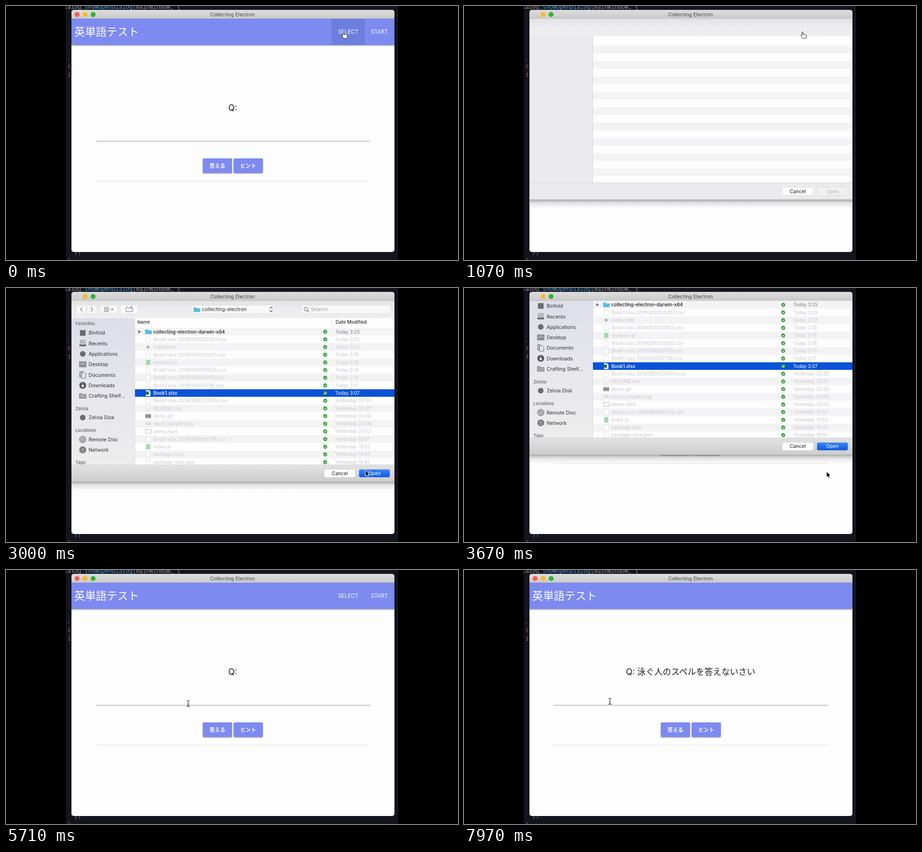
Write an HTML page that moves like this. It is 960 px wide and 540 px high and loops after 8000 ms.

```html
<!DOCTYPE html>
<html lang="ja">
<head>
<meta charset="utf-8">
<title>英単語テスト</title>
<style>
html, body { margin: 0; width: 100%; height: 100%; overflow: hidden; background: #000; }
svg { display: block; width: 960px; height: 540px; font-family: Inter, "Noto Sans CJK JP", "Noto Sans CJK", sans-serif; }
.code { font-family: "Noto Sans Mono", "DejaVu Sans Mono", monospace; }
text { white-space: pre; }
</style>
</head>
<body>
<svg id="stage" viewBox="0 0 960 540"></svg>
<script>
const LOOP = 8000, SHEET_HEIGHT = 385, SLIDE = 345;
const OPENING = 731, CLOSING = 3584, CLOSED = CLOSING + SLIDE;
const INK = '#303033', FAINT = '#c9c9ce', PURPLE = '#7d8af0', HOVER = '#6d7fdd', PAPER = '#fdfdfd';
const PANEL = '#ebebee', RED = '#fc5b50';

const attrs = (o = {}) => Object.entries(o).map(([k, v]) => ` ${k}="${v}"`).join('');
const rect = (x, y, w, h, fill, more) => `<rect x="${x}" y="${y}" width="${w}" height="${h}" fill="${fill}"${attrs(more)}/>`;
const circle = (x, y, r, fill, more) => `<circle cx="${x}" cy="${y}" r="${r}" fill="${fill}"${attrs(more)}/>`;
const path = (d, stroke, width = 1, fill = 'none') => `<path d="${d}" fill="${fill}" stroke="${stroke}" stroke-width="${width}"/>`;
// Text is placed by the vertical middle of its capitals.
const text = (x, y, s, size, fill = INK, more) =>
  `<text x="${x}" y="${y + size * 0.363}" font-size="${size}" fill="${fill}"${attrs(more)}>${s}</text>`;
const group = (id, body, more) => `<g id="${id}"${attrs(more)}>${body}</g>`;
const gradient = (id, ...stops) => `<linearGradient id="${id}" x2="0" y2="1">` +
  stops.map(([at, color, alpha = 1]) => `<stop offset="${at}" stop-color="${color}" stop-opacity="${alpha}"/>`).join('') + '</linearGradient>';
const MIDDLE = { 'text-anchor': 'middle' };
const MEDIUM = { 'font-weight': 500 };

const defs = `<defs>
  ${gradient('bar', [0, '#dedede'], [1, '#cacaca'])}
  ${gradient('footer', [0, '#e2e2e3'], [1, '#cdcdce'])}
  ${gradient('tools', [0, '#e2e2e3'], [0.5, '#ededef'], [1, '#eeeef0'])}
  ${gradient('side', [0, '#dedeea'], [0.5, '#e6e6ec'], [1, '#ededed'])}
  ${gradient('blue', [0, '#3f88f6'], [1, '#0b56e0'])}
  ${gradient('fade', [0, '#202024', 0.38], [0.35, '#404044', 0.16], [1, '#606064', 0])}
  <clipPath id="desktop"><rect x="127" width="706" height="540"/></clipPath>
  <clipPath id="window"><rect x="139" y="8.5" width="686" height="514.5" rx="5"/></clipPath>
  <clipPath id="below"><rect x="139" y="27" width="686" height="496"/></clipPath>
  <clipPath id="lists"><rect x="139" y="64" width="686" height="312"/></clipPath>
  <filter id="soft" x="-10%" y="-20%" width="120%" height="150%">
    <feDropShadow dx="0" dy="1.3" stdDeviation="1.3" flood-color="#404048" flood-opacity=".5"/>
  </filter>
</defs>`;

function editor() {
  const code = (x, y, s, fill) => `<text class="code" x="${x}" y="${y}" font-size="12.1" fill="${fill}">${s}</text>`;
  return group('editor', rect(127, 0, 706, 540, '#14141d') +
    code(116, 6, 'dialog.', '#8c8c96') + code(167, 6, 'showOpenDialog', '#4f9fd0') + code(269, 6, '(mainWindow, {', '#96969e') +
    code(122, 114, ').', '#8c8c96') + code(131, 132, 'c', '#b8585c') + code(131, 150, 'i', '#b8585c') +
    code(145, 528, '})', '#777780') + code(131, 545, '}', '#777780'), { 'clip-path': 'url(#desktop)' });
}

function page() {
  const button = (x, label) => rect(x, 324, 62, 31, PURPLE, { rx: 2, filter: 'url(#soft)' }) +
    text(x + 31, 339.5, label, 11.3, '#fff', { ...MIDDLE, 'font-weight': 700 });
  return rect(139, 8, 686, 515, PAPER) +
    rect(139, 20, 686, 63, PURPLE, { filter: 'url(#soft)' }) +
    text(145, 55, '英単語テスト', 22.9, '#fff', MEDIUM) +
    group('nav',
      rect(692, 27, 70, 56, HOVER, { id: 'hoverSelect' }) + rect(762, 27, 63, 56, HOVER, { id: 'hoverStart' }) +
      text(726.7, 55, 'SELECT', 11.4, '#fff', MIDDLE) + text(793, 55, 'START', 11.4, '#fff', MIDDLE)) +
    text(481.5, 216, 'Q:', 18, '#1c1c1e', { ...MIDDLE, id: 'question' }) +
    rect(190, 287, 583, 1, '#949496') + rect(190, 372, 583, 1, '#dcdcde') +
    button(418, '答える') + button(483.5, 'ヒント');
}

const folder = (x, y, fill, stroke = 'none') => path(`M${x - 7} ${y - 5}h5l1.5 2h7.5v8h-14z`, stroke, 1, fill);
const sheetOfPaper = (x, y, stroke, fill = 'none') => path(`M${x - 4.5} ${y - 6}h6l3 3v9h-9z`, stroke, 1, fill);

const GREY = '#6c6c70';
const sideIcons = {
  square: y => rect(157, y - 6, 12, 12, GREY),
  disk: y => circle(163, y, 6, GREY),
  recent: y => rect(158, y - 6.5, 10, 9, 'none', { stroke: GREY }) + path(`M160 ${y - 3}h6m-6 2h6`, GREY) + rect(156, y + 2, 14, 4, GREY),
  desktop: y => rect(156, y - 5.5, 14, 11, '#a2a2a6', { stroke: GREY }) + path(`M157 ${y + 3}h12`, GREY),
  papers: y => sheetOfPaper(161, y - 1, GREY, '#b8b8bc') + sheetOfPaper(165, y + 1, GREY, '#e4e4e8'),
  down: y => circle(163, y, 7.3, '#555558') + path(`M163 ${y - 4}v7m-3 -3l3 3.5l3 -3.5`, '#f2f2f4', 1.7),
  folder: y => folder(163, y, '#aaaaae', GREY),
  disc: y => circle(163, y, 7, '#b4b4b8', { stroke: GREY }) + circle(163, y, 2, '#eeeeee', { stroke: GREY }),
  globe: y => circle(163, y, 7.3, GREY) + path(`M156 ${y}h14M163 ${y - 7}v14M158 ${y - 4}q5 3 10 0M158 ${y + 4}q5 -3 10 0`, '#d4d4d8', 0.8),
};

function sidebar() {
  const heads = [[76, 'Favorites'], [256.5, 'Zelvia'], [302.5, 'Locations'], [371, 'Tags']];
  const items = [
    [95.5, 'square', 'Binfold'], [118, 'recent', 'Recents'], [140, 'disk', 'Applications'], [162.3, 'desktop', 'Desktop'],
    [184.7, 'papers', 'Documents'], [207, 'down', 'Downloads'], [229.3, 'folder', 'Crafting Shelf...'],
    [275.5, 'disk', 'Zelvia Disk'], [322, 'disc', 'Remote Disc'], [344, 'globe', 'Network'],
  ];
  return heads.map(([y, s]) => text(147.5, y, s, 9.3, '#717175', { 'font-weight': 600 })).join('') +
    items.map(([y, icon, s]) => sideIcons[icon](y) + text(175.5, y, s, 10.6)).join('');
}

const files = `collecting-electron-darwin-x64|Today 3:25
Book1.xlsx.20190810032457.csv|Today 3:25
index.html|Today 3:22
Book1.xlsx.20190810031825.csv|Today 3:18
renderer.js|Today 3:18
Book1.xlsx.20190810031623.csv|Today 3:16
Book1.xlsx.20190810031415.csv|Today 3:14
Book1.xlsx.20190810031116.csv|Today 3:11
Book1.xlsx|Today 3:07
Book1.xlsx.20190809203504.csv|Yesterday 20:35
README.md|Yesterday 20:27
demo.gif|Yesterday 20:26
excel_sample.png|Yesterday 20:06
demo.mp4|Yesterday 20:03
Book1.xlsx.20190809195719.csv|Yesterday 19:57
index.js|Yesterday 19:52
package.json|Yesterday 19:47
package-lock.json|Yesterday 19:41`.split('\n').map(line => line.split('|'));
const PICK = 8, rowY = i => 93 + i * 16.3;

function fileIcon(name, y) {
  if (!name.includes('.')) return path(`M281 ${y - 3.5}l6 3.5l-6 3.5z`, 'none', 0, '#747478') + folder(302.5, y, '#55bfe8');
  if (name.endsWith('.xlsx')) return sheetOfPaper(302, y, '#d0d0d2', '#fff') + rect(296.5, y - 3.5, 7, 7, '#28763c');
  if (name.endsWith('.html')) return circle(302, y, 3.2, '#a9b8b0');
  if (name.endsWith('.js')) return rect(297.5, y - 5.5, 9, 11, '#9fdcab');
  if (name.endsWith('.gif')) return rect(296, y - 4.5, 12, 9, '#8a8a80') + path(`M297 ${y - 3}h10m-10 6h10`, '#dedee0');
  if (name.endsWith('.png')) return path(`M296 ${y - 2}h12m-12 3h12`, '#c2c2c6', 1.2);
  if (name.endsWith('.mp4')) return rect(296.5, y - 4, 12, 8, '#fdfdfd', { stroke: '#b8b8bc' });
  return sheetOfPaper(302, y, '#dcdcde', '#fefefe') + (name.endsWith('.md') ? path(`M299 ${y - 1}h6m-6 2h6m-6 2h6`, '#c8c8ca', 0.7) : '');
}

function fileRow([name, date], i) {
  const y = rowY(i), live = i === 0 || i === PICK, extra = live ? MEDIUM : {};
  const picked = i === PICK ? 'picked' : '';
  return fileIcon(name, y) +
    text(313, y, name, 10.1, live ? '#1c1c1e' : FAINT, { ...extra, class: picked }) +
    text(699, y, date, 9.9, live ? '#808084' : FAINT, { class: picked });
}

function sheet() {
  const tool = (x, w) => rect(x, 36.5, w, 18, '#f8f8f9', { rx: 3, stroke: '#d8d8da', 'stroke-width': 0.7 });
  const stripes = files.map((_, i) => i % 2 ? '' : rect(274, rowY(i) - 8.15, 551, 16.3, '#f3f3f5')).join('');
  const checks = files.map((_, i) => circle(678, rowY(i), 4.3, '#2fa52c') + path(`M676 ${rowY(i)}l1.5 1.7l2.8 -3.4`, '#fff', 1.1)).join('');
  const toolbar = tool(149, 21) + tool(172, 21) + tool(200, 37) + tool(243, 38) + tool(393, 178) + tool(628, 188) +
    path('M162 41l-4 4.5l4 4.5M180 41l4 4.5l-4 4.5', '#848488', 1.3) +
    path('M208 41h11m-11 3h11m-11 3h11m-11 3h11M223 44l2.7 2.7l2.7 -2.7', '#646468', 1.2) +
    path('M255 41h4l2 2h8v7h-14zM266 38v5m-2.5 -2.5h5', '#747478') +
    folder(405.5, 46, '#55bfe8') + text(416, 45.5, 'collecting-electron', 10.7) +
    path('M560 43.5l3 -3l3 3m-6 4l3 3l3 -3', '#535356', 1.3) +
    circle(637, 45, 3.8, 'none', { stroke: '#646468', 'stroke-width': 1.2 }) + path('M640 48l3.5 3.5', '#646468', 1.2) +
    text(648, 45.5, 'Search', 10.6, '#9c9ca0');
  const content = toolbar + group('lists-content', rect(139, 64, 134, 312, 'url(#side)') + sidebar() +
    text(279, 72.5, 'Name', 9.6, INK, MEDIUM) + text(700, 72.5, 'Date Modified', 9.9, INK, MEDIUM) + rect(690, 66, 1, 16, '#d8d8da') +
    rect(274, rowY(PICK) - 8.1, 551, 16, '#0a52d8', { id: 'selection' }) +
    files.map(fileRow).join('') + group('checks', checks), { 'clip-path': 'url(#lists)' });
  const push = (x, label, id) => rect(x, 385.5, 66, 17, '#fefefe', { rx: 3.5, id, stroke: '#cfcfd1', 'stroke-width': 0.6 }) +
    text(x + 33, 394, label, 10.5, '#1c1c1e', { ...MIDDLE, id: id + 'Label' });
  return group('sheetClip', group('sheet',
    rect(139, 412, 686, 18, 'url(#fade)') +
    rect(139, 27, 686, 385, PANEL) + rect(139, 27, 686, 37, 'url(#tools)') +
    rect(273, 64, 552, 312, PAPER) +
    group('rows', stripes, { 'clip-path': 'url(#lists)' }) +
    group('content', content) + rect(273, 64, 1, 312, '#d6d6d9') +
    rect(139, 376, 686, 36, 'url(#footer)', { id: 'bottom' }) + rect(139, 375.5, 686, 1, '#d4d4d6') +
    rect(139, 411.5, 686, 0.8, '#b0b0b3') +
    push(676, 'Cancel', 'cancel') + push(749.5, 'Open', 'open')), { 'clip-path': 'url(#below)' });
}

const titleBar = () => rect(139, 8, 686, 19, 'url(#bar)') + rect(139, 26.3, 686, 0.7, '#b6b6b8') +
  [RED, '#fdb924', '#2cb52f'].map((c, i) => circle(151 + 17 * i, 18, 5.2, c, i ? {} : { id: 'close' })).join('') +
  text(481, 18.5, 'Collecting Electron', 10.7, '#47474a', MIDDLE);

const cursors = group('cursor',
  group('arrow', path('M0 0v12.5l2.8 -2.6l2 4.6l2.3 -1l-2 -4.4h4z', '#fff', 1, '#000')) +
  group('hand', path('M-1.5 1q1.5 -2 2.5 0v5l1 -1.5l2 .5l.5 .5l2 .3l.5 1l1.4 .8v3l-1.6 3.4h-6l-4.3 -5.5q0 -2 2 -.5z', '#222', 1, '#fff')) +
  group('beam', path('M-3.5 -6.5q3 0 3.5 1.5q.5 -1.5 3.5 -1.5M0 -5v10M-3.5 6.5q3 0 3.5 -1.5q.5 1.5 3.5 1.5M-1.5 1.5h3', '#303033', 1.2)));

document.getElementById('stage').innerHTML = defs + editor() +
  group('app', page() + sheet() + titleBar(), { 'clip-path': 'url(#window)' }) + cursors;

const el = id => document.getElementById(id);
const show = (id, on) => el(id).setAttribute('display', on ? 'inline' : 'none');
const fill = (id, color) => el(id).setAttribute('fill', color);
const picked = [...document.querySelectorAll('.picked')].map(node => [node, node.getAttribute('fill')]);

const ease = x => (1 - Math.cos(Math.PI * Math.min(1, Math.max(0, x)))) / 2;
const moves = [ // time, x, y of the pointer's hot spot
  [0, 717, 55], [500, 719, 55], [1150, 719, 55], [1720, 383, 197], [1800, 383, 197], [2000, 365, 220],
  [2450, 365, 220], [3050, 770, 390], [4250, 770, 390], [4950, 387, 284], [5900, 387, 284],
  [6450, 790, 56], [7150, 790, 56], [7850, 310, 279], [LOOP, 310, 279],
];

function pointer(t) {
  const i = moves.findIndex(m => m[0] > t);
  const [t0, x0, y0] = moves[i - 1], [t1, x1, y1] = moves[i];
  const p = ease((t - t0) / (t1 - t0));
  return [x0 + (x1 - x0) * p, y0 + (y1 - y0) * p];
}

function render(t) {
  const open = ease((t - OPENING) / SLIDE) - ease((t - CLOSING) / SLIDE);
  const [x, y] = pointer(t);
  const started = t >= 6900, loaded = t >= 1150, chosen = t >= 2150;
  const inside = (l, top, r, b) => x >= l && x < r && y >= top && y < b;
  const free = t < OPENING || t >= CLOSED;
  const overSelect = free && !started && inside(692, 27, 762, 83);
  const overStart = free && !started && inside(762, 27, 825, 83);

  show('sheetClip', !free);
  el('sheet').setAttribute('transform', `translate(0 ${(open - 1) * SHEET_HEIGHT})`);
  show('content', loaded);
  show('checks', t >= 1900);
  show('selection', chosen);
  for (const [node, color] of picked) node.setAttribute('fill', chosen ? '#fff' : color);
  fill('bottom', loaded ? 'url(#footer)' : PANEL);
  fill('open', chosen ? 'url(#blue)' : '#f1f1f2');
  fill('openLabel', chosen ? '#fff' : '#b8b8bb');
  fill('close', free ? RED : '#d2d2d4');

  show('nav', !started);
  show('hoverSelect', overSelect || t < 1000);
  show('hoverStart', overStart);
  el('question').textContent = started ? 'Q: 泳ぐ人のスペルを答えないさい' : 'Q:';

  const hand = t < 1150 || overStart || overSelect || free && inside(418, 324, 545, 355);
  const beam = !hand && free && inside(190, 255, 773, 289);
  show('hand', hand);
  show('beam', beam);
  show('arrow', !hand && !beam);
  el('cursor').setAttribute('transform', `translate(${x} ${y})`);
}

function tick() {
  render(performance.now() % LOOP);
  requestAnimationFrame(tick);
}
tick();
</script>
</body>
</html>
```
